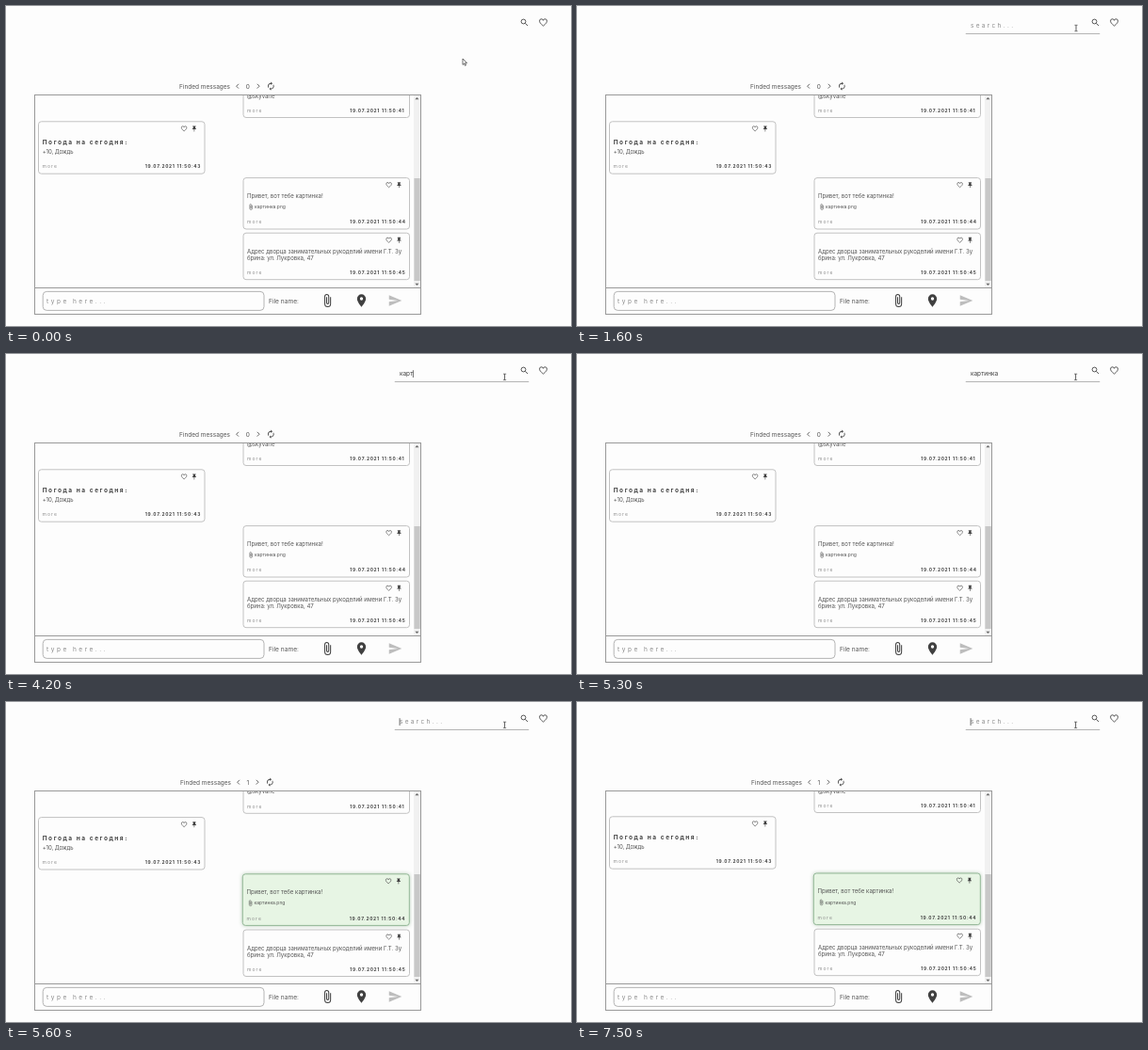
An HTML page with a canvas for the animation above (8000 ms loop, 600 px wide and 340 px high).

```html
<!DOCTYPE html>
<html lang="ru">
<head>
<meta charset="utf-8">
<title>Chat search</title>
<style>
html, body { margin: 0; width: 100%; height: 100%; overflow: hidden; background: #fdfdfd; }
canvas { display: block; width: 600px; height: 340px; }
</style>
</head>
<body>
<canvas id="stage"></canvas>
<script>
const LOOP = 8000, STEP = 100;
const BG = '#fdfdfd', INK = '#555', DARK = '#404040', MUTED = '#8a8a8a';
const FRAME = '#999', LINE = '#c2c2c2', FIELD = '#b4b4b4';

const stage = document.getElementById('stage');
const dpr = window.devicePixelRatio || 1;
stage.width = 600 * dpr;
stage.height = 340 * dpr;
const c = stage.getContext('2d');

// Icons on a 24 unit grid; w is the stroke width, none means filled.
const icons = {
  search: { w: 2, d: 'M4 9.5a5.5 5.5 0 1 0 11 0a5.5 5.5 0 1 0-11 0M13.6 13.6L19.8 19.8' },
  heart: { w: 2, d: 'M12 20C5 14 3 11.5 3 8.5A4.5 4.5 0 0 1 12 6.5A4.5 4.5 0 0 1 21 8.5C21 11.5 19 14 12 20Z' },
  clip: { w: 1.6, d: 'M17.2 6v11.5a4.7 4.7 0 0 1-9.4 0V5a3.2 3.2 0 0 1 6.4 0v10.5a1.7 1.7 0 0 1-3.4 0V6' },
  left: { w: 2, d: 'M14.5 6L8.5 12L14.5 18' },
  right: { w: 2, d: 'M9.5 6L15.5 12L9.5 18' },
  pin: { d: 'M16 9V4h1a1 1 0 0 0 0-2H7a1 1 0 0 0 0 2h1v5a3 3 0 0 1-3 3v2h6v7l1 1 1-1v-7h6v-2a3 3 0 0 1-3-3z' },
  place: { d: 'M12 2a7 7 0 0 0-7 7c0 5.25 7 13 7 13s7-7.75 7-13a7 7 0 0 0-7-7zm0 9.5a2.5 2.5 0 0 1 0-5a2.5 2.5 0 0 1 0 5z' },
  send: { d: 'M2 21L23 12L2 3v7l15 2-15 2z' },
  renew: { d: 'M12 6v3l4-4-4-4v3a8 8 0 0 0-6.76 12.26L6.7 14.8A6 6 0 0 1 12 6zM18.76 7.74L17.3 9.2A6 6 0 0 1 12 18v-3l-4 4 4 4v-3a8 8 0 0 0 6.76-12.26z' }
};
for (const k in icons) icons[k].path = new Path2D(icons[k].d);

function icon(name, x, y, size, color = DARK) {
  const { w, path } = icons[name];
  c.save();
  c.translate(x - size / 2, y - size / 2);
  c.scale(size / 24, size / 24);
  if (w) {
    c.lineWidth = w;
    c.strokeStyle = color;
    c.stroke(path);
  } else {
    c.fillStyle = color;
    c.fill(path, 'evenodd');
  }
  c.restore();
}

function text(s, x, y, size, { color = INK, weight = 400, gap = 0 } = {}) {
  c.font = `${weight} ${size}px Inter, "Open Sans", sans-serif`;
  c.letterSpacing = gap + 'px';
  c.fillStyle = color;
  c.fillText(s, x, y);
  return c.measureText(s).width;
}

function line(x1, y1, x2, y2, color, w = 1) {
  c.strokeStyle = color;
  c.lineWidth = w;
  c.beginPath();
  c.moveTo(x1, y1);
  c.lineTo(x2, y2);
  c.stroke();
}

function box(x, y, w, h, r, color, fill) {
  c.beginPath();
  c.roundRect(x, y, w, h, r);
  if (fill) {
    c.fillStyle = fill;
    c.fill();
  }
  c.shadowColor = 'transparent';
  c.strokeStyle = color;
  c.lineWidth = 1;
  c.stroke();
}

function poly(points, fill) {
  c.beginPath();
  points.forEach(([x, y]) => c.lineTo(x, y));
  c.closePath();
  c.fillStyle = fill;
  c.fill();
}

function card(x, y, h, sec, lit) {
  c.save();
  if (lit) {
    c.shadowColor = 'rgba(60, 120, 60, .45)';
    c.shadowBlur = 4 * dpr;
    box(x - .7, y, 177, h, 3, '#94b898', '#e7f5e4');
  } else {
    box(x, y, 176.5, h, 3, LINE, BG);
  }
  c.restore();
  const dx = lit ? -.5 : 0;
  icon('heart', x + 154.6 + dx, y + 7.7, 7.3);
  icon('pin', x + 165.4 + dx, y + 7.7, 7.3);
  const base = y + h - 5.8;
  text('more', x + 4 + dx, base, 5, { color: MUTED, gap: 1.1 });
  text('19.07.2021 11:50:' + sec, x + 113.2 + dx, base, 4.8, { weight: 700, color: DARK, gap: .71 });
}

function messages(found, scroll) {
  c.save();
  c.beginPath();
  c.rect(31, 95, 402, 204);
  c.clip();
  c.translate(0, -scroll);

  card(252, 70, 48.5, 41);
  text('@skyvane', 256, 97.6, 6);

  card(34.5, 122.8, 55.4, 43);
  text('Погода на сегодня:', 38.7, 146.8, 6.5, { weight: 700, color: DARK, gap: 1.55 });
  text('+10, Дождь', 38.7, 157.3, 6, { gap: -.1 });

  const dx = found ? -.5 : 0, dy = found ? .4 : 0;
  card(252, 182.6 + dy, 54.4 + dy / 2, 44, found);
  text('Привет, вот тебе картинка!', 256 + dx, 203.9 + dy, 6.1);
  icon('clip', 260 + dx, 213.5 + dy, 7);
  text('картинка.png', 264 + dx, 215.2 + dy, 5);

  const y = found ? 1 : 0;
  card(252, 241.2 + y, 49.5, 45);
  text('Адрес дворца занимательных рукоделий имени Г.Т. Зу', 256, 262.7 + y, 6.05);
  text('брина: ул. Лукровка, 47', 256, 270.2 + y, 6.05);
  c.restore();
}

function chat(found, scroll) {
  const s = found ? 1 : 0;
  text('Finded messages', 184 + s, 87.6, 6.5);
  icon('left', 246 + s, 85.2, 9.5);
  text(String(s), found ? 255.6 : 254.7, 87.6, 6.5);
  icon('right', 267.7 - s, 85.2, 9.5);
  icon('renew', 281.3 - s, 85.2, 10);

  messages(found, scroll);

  c.fillStyle = '#f1f1f1';
  c.fillRect(433, 95, 7, 204);
  c.fillStyle = '#c8c8c8';
  c.fillRect(433.4, 183, 6.4, 109);
  poly([[434.4, 99.3], [436.4, 97], [438.4, 99.3]], '#666');
  poly([[434.4, 294.8], [436.4, 297], [438.4, 294.8]], '#666');

  c.strokeStyle = FRAME;
  c.lineWidth = 1;
  c.strokeRect(30.5, 94.5, 410, 233);
  line(30.5, 299.5, 440.5, 299.5, FRAME);
  box(39.2, 303.4, 234.8, 20, 4, FIELD);
  text('type here...', 43, 315.6, 6.5, { color: MUTED, gap: 2.5 });
  text('File name:', 279, 315.6, 6.6);
  icon('clip', 341.3, 313, 15.5);
  icon('place', 377.5, 313, 16, DARK);
  icon('send', 413.2, 313, 15.5, '#bdbdbd');
}

const word = 'картинка';
const keys = [3500, 3800, 4000, 4200, 4300, 4500, 4600, 4800];
const caretFlips = [1000, 1600, 2100, 2600, 3100, 5300, 5500, 5900, 6400, 6900, 7500];
const passed = (times, t) => times.filter(at => t >= at).length;
const clamp = v => Math.min(1, Math.max(0, v));
const ease = v => v * v * (3 - 2 * v);

function search(t, found) {
  const open = ease(clamp((t - 900) / 600));
  if (open > 0) {
    const x = 555.5 - 143 * open;
    const typed = found ? '' : word.slice(0, passed(keys, t));
    c.save();
    c.beginPath();
    c.rect(x, 12, 555.5 - x, 20);
    c.clip();
    line(x, 29.5, 555.5, 29.5, FIELD);
    let w = 0;
    if (typed) w = text(typed, x + 5.4, 23.3, 6.55, { color: DARK });
    else text('search...', x + 5.4, 23.3, 6.4, { color: MUTED, gap: 2.4 });
    if (passed(caretFlips, t) % 2) line(x + 5.6 + w, 17.2, x + 5.6 + w, 25, '#333', .7);
    c.restore();
  }
  icon('search', 550.6, 17.6, 10.5);
  icon('heart', 570.5, 17.7, 10.3);
}

// Pointer stops: time, x, y
const stops = [
  [0, 485, 56], [100, 415, 118], [200, 342, 178], [300, 316, 193], [400, 392, 135],
  [500, 500, 52], [600, 549.8, 21], [900, 549.8, 21], [1600, 530, 23.5], [1700, 529.6, 24.4]
];

function pointer(t) {
  let i = stops.findIndex(s => s[0] > t);
  if (i < 0) i = stops.length;
  const a = stops[i - 1], b = stops[i] || a;
  const k = b === a ? 0 : (t - a[0]) / (b[0] - a[0]);
  const x = a[1] + (b[1] - a[1]) * k, y = a[2] + (b[2] - a[2]) * k;
  c.save();
  c.translate(x, y);
  if (t < 600) {
    c.beginPath();
    [[0, 0], [0, 6.4], [1.5, 5.1], [2.5, 7.4], [3.5, 6.9], [2.5, 4.7], [4.5, 4.6]].forEach(p => c.lineTo(...p));
    c.closePath();
    c.fillStyle = '#fff';
    c.fill();
    c.strokeStyle = '#333';
    c.lineWidth = .7;
    c.stroke();
  } else {
    line(0, -3.2, 0, 3.2, '#333', .8);
    line(-1.6, -3.2, 1.6, -3.2, '#333', .6);
    line(-1.6, 3.2, 1.6, 3.2, '#333', .6);
  }
  c.restore();
}

function draw(now) {
  const t = Math.floor(now % LOOP / STEP) * STEP;
  const found = t >= 5500;
  c.setTransform(dpr, 0, 0, dpr, 0, 0);
  c.fillStyle = BG;
  c.fillRect(0, 0, 600, 340);
  chat(found, clamp((t - 5500) / 500));
  search(t, found);
  pointer(t);
}

let start;
function tick(now) {
  start ??= now;
  draw(now - start);
  requestAnimationFrame(tick);
}
draw(0);
requestAnimationFrame(tick);
</script>
</body>
</html>
```
